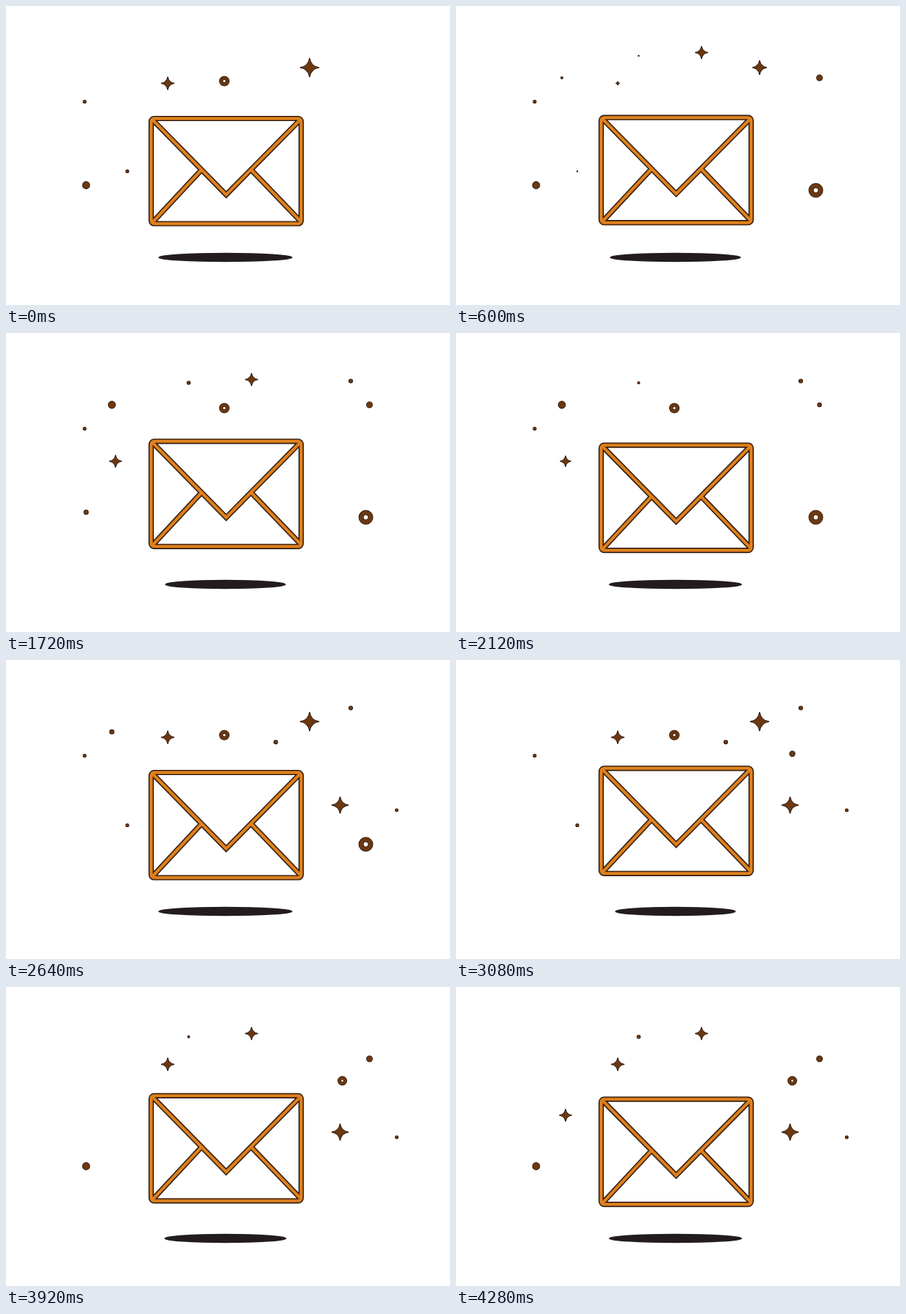
An HTML page with a canvas that plays this animation: 604x408 px, repeating every 4.32 s.

```html
<!DOCTYPE html>
<html lang="en">
<head>
<meta charset="utf-8">
<title>Floating envelope</title>
<style>
html, body { margin: 0; width: 604px; height: 408px; overflow: hidden; background: #fff; }
canvas { display: block; }
</style>
</head>
<body>
<canvas id="stage" width="604" height="408"></canvas>
<script>
const ctx = document.getElementById('stage').getContext('2d');
const LOOP = 4320, STEP = 40, BOB = 2160, FADE = 300;
const EVER = 9999;

// Each spark: shape, x, y, radius, then pairs of on and off times in ms
const sparks = [
  ['star', 220, 105.5, 8.5, -EVER, 700, 2200, EVER],
  ['star', 413, 84, 12.5, -EVER, 800, 2250, 3800],
  ['ring', 297, 102.5, 6.3, -EVER, 600, 1400, 3700],
  ['dot', 107, 130.5, 1.8, -EVER, 3700],
  ['dot', 109, 244.5, 4.6, -EVER, 1890, 3200, EVER],
  ['dot', 165, 225.5, 1.8, -EVER, 700, 2200, 3600],
  ['dot', 144, 98, 4.6, 500, 2810],
  ['dot', 248.5, 68, 2, 500, 2300, 3750, EVER],
  ['star', 334, 63.5, 8.2, 250, 2150, 3050, EVER],
  ['dot', 494.5, 98, 3.7, 300, 2300, 3300, EVER],
  ['star', 454.5, 198, 11, 700, 1600, 2300, EVER],
  ['dot', 531.5, 205, 1.7, 750, 1600, 2350, EVER],
  ['ring', 489.5, 251.5, 9.2, 250, 2950],
  ['dot', 469, 65.5, 2.3, 1350, 3600],
  ['star', 149, 175, 8, 1350, 2350, 3950, EVER],
  ['dot', 367, 112, 2.3, 2200, 3600],
  ['ring', 457.5, 128, 5.7, 2910, EVER]
];

const ease = p => {
  p = Math.min(1, Math.max(0, p));
  return p * p * (3 - 2 * p);
};

function sparkScale(times, t) {
  let scale = 0;
  for (let i = 0; i < times.length; i += 2) {
    const edge = Math.min(t - times[i], times[i + 1] - t);
    scale = Math.max(scale, ease(edge / FADE));
  }
  return scale;
}

function drawSpark([shape, x, y, radius, ...times], t) {
  const r = radius * sparkScale(times, t);
  if (r < 0.3) return;
  const path = new Path2D();
  if (shape === 'star') {
    const c = r * 0.13;
    path.moveTo(x, y - r);
    path.quadraticCurveTo(x + c, y - c, x + r, y);
    path.quadraticCurveTo(x + c, y + c, x, y + r);
    path.quadraticCurveTo(x - c, y + c, x - r, y);
    path.quadraticCurveTo(x - c, y - c, x, y - r);
    path.closePath();
  } else {
    path.arc(x, y, r, 0, 7);
    if (shape === 'ring') {
      const hole = r * 0.4;
      path.moveTo(x + hole, y);
      path.arc(x, y, hole, 0, 7);
    }
  }
  ctx.fillStyle = '#6c3811';
  ctx.strokeStyle = '#2a170d';
  ctx.lineWidth = 1.6;
  ctx.lineJoin = 'round';
  ctx.stroke(path);
  ctx.fill(path, 'evenodd');
}

const envelope = new Path2D('M200 156L299.5 257.5L399.5 156M266 223.5L200 294.5M333 223L400.5 293.5');
envelope.roundRect(197.5, 153.5, 204, 143.5, 4);

function drawEnvelope(dy) {
  ctx.save();
  ctx.translate(0, dy);
  ctx.lineJoin = 'miter';
  for (const [color, width] of [['#22120a', 7.2], ['#8f4f14', 5], ['#e0821e', 3.4]]) {
    ctx.strokeStyle = color;
    ctx.lineWidth = width;
    ctx.stroke(envelope);
  }
  ctx.restore();
}

function drawShadow(halfWidth) {
  ctx.fillStyle = ctx.strokeStyle = '#231c1d';
  ctx.lineWidth = 1.6;
  ctx.beginPath();
  ctx.ellipse(298.5, 343, halfWidth - 0.8, 5.4, 0, 0, 7);
  ctx.fill();
  ctx.stroke();
}

function frame(now) {
  const t = Math.floor(now % LOOP / STEP) * STEP;
  const wave = Math.cos((t - 240) / BOB * 2 * Math.PI);
  ctx.clearRect(0, 0, 604, 408);
  drawShadow(85.3 + 7.8 * wave);
  drawEnvelope(4.9 * wave - 3.75);
  for (const spark of sparks) drawSpark(spark, t);
  requestAnimationFrame(frame);
}

frame(0);
</script>
</body>
</html>
```
